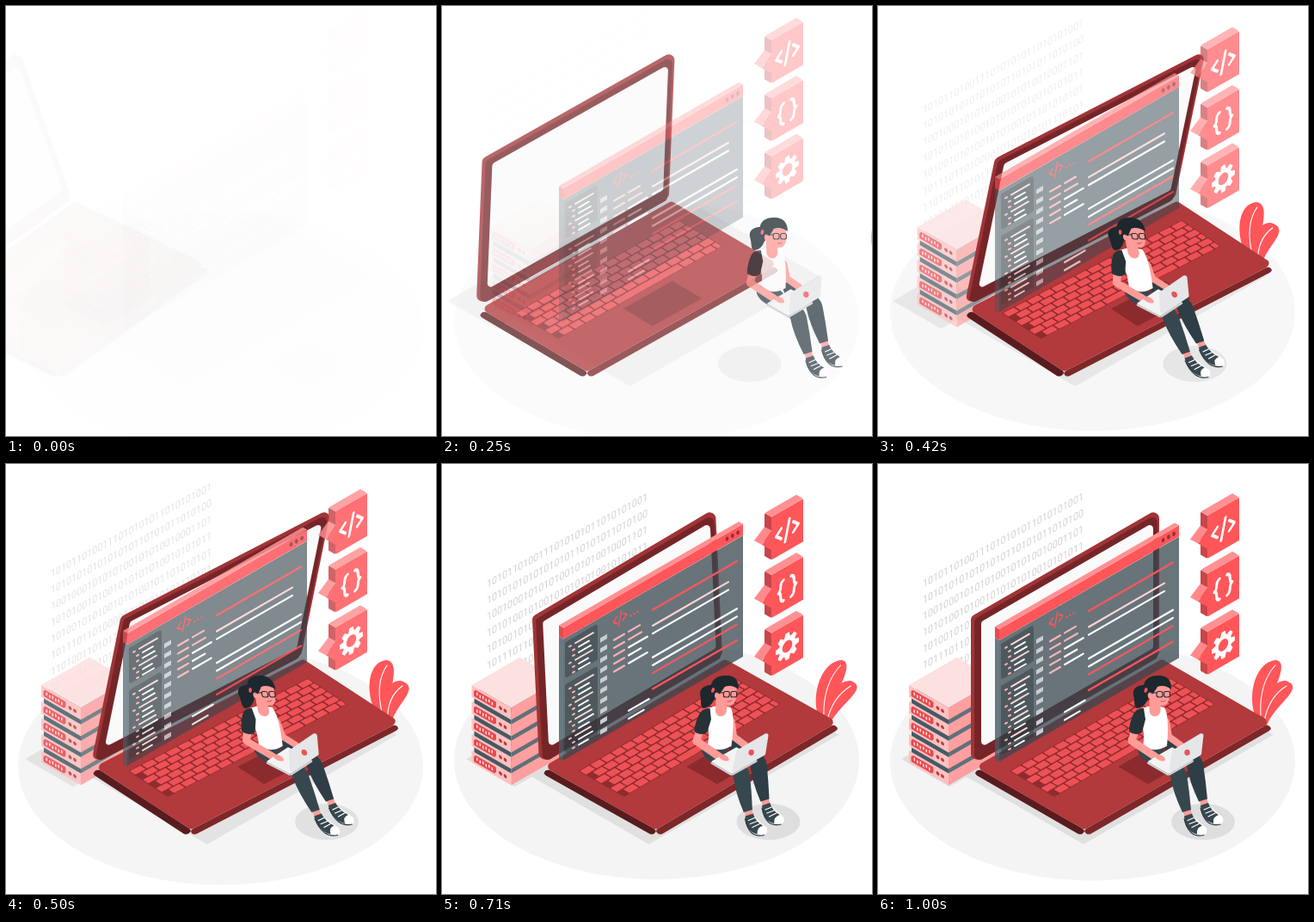
These frames come from a looping animation (500x500 px, 1040 ms). An HTML page with a canvas:

```html
<!DOCTYPE html>
<html lang="en">
<head>
<meta charset="utf-8">
<title>Coding workspace</title>
<style>
html, body { margin: 0; width: 100%; height: 100%; overflow: hidden; background: #fff; }
canvas { display: block; width: 500px; height: 500px; }
</style>
</head>
<body>
<canvas id="stage"></canvas>
<script>
const SIZE = 500, LOOP = 1040, FPS = 24, ISO = .577;
const CORAL = '#ff565a', LIGHT = '#ff9193', PINK = '#ffb3b5', WHITE = '#fff', KEY = '#ee5155';
const HAIR = '#1c282e', INK = '#263238', SLATE = '#37474f', SKIN = '#ff9c98';
const scale = Math.max(1, window.devicePixelRatio || 1);
const stage = document.getElementById('stage');
const buffer = document.createElement('canvas');
stage.width = stage.height = buffer.width = buffer.height = SIZE * scale;
const out = stage.getContext('2d'), g = buffer.getContext('2d');

function seeded(seed) {
  return () => (seed = (seed * 16807) % 2147483647) / 2147483647;
}

// ---- timing ----
const bez = (s, a, b) => 3 * (1 - s) ** 2 * s * a + 3 * (1 - s) * s * s * b + s ** 3;
function ease(u) {
  if (u <= 0) return 0;
  if (u >= 1) return 1;
  let lo = 0, hi = 1;
  for (let i = 0; i < 30; i++) {
    const m = (lo + hi) / 2;
    if (bez(m, .36, .5) < u) lo = m; else hi = m;
  }
  return bez(lo, -.01, 1.38);
}

// Rush in sideways with a lean that swings past upright and settles.
function rush(t, dir, pivot) {
  let dx = 0, deg = 0, alpha = 1;
  if (t < .6) {
    alpha = ease(t / .6);
    dx = 250 * (1 - alpha);
    deg = -20 + 30 * alpha;
  } else if (t < .8) deg = 10 - 12 * ease((t - .6) / .2);
  else deg = -2 + 2 * ease((t - .8) / .2);
  return { dx: dx * dir, lean: Math.tan(deg * dir * Math.PI / 180), pivot, alpha };
}

function slide(t, dx, dy) {
  const alpha = ease(t);
  return { dx: dx * (1 - alpha), dy: dy * (1 - alpha), alpha };
}

// ---- drawing helpers ----
function poly(color, pts, r = 0) {
  const n = pts.length, last = pts[n - 1];
  g.beginPath();
  g.moveTo((pts[0][0] + last[0]) / 2, (pts[0][1] + last[1]) / 2);
  pts.forEach((p, i) => g.arcTo(...p, ...pts[(i + 1) % n], r));
  g.closePath();
  g.fillStyle = color;
  g.fill();
}
// Upright face: width w along the slope s (-1 rises to the right), height h.
function panel(color, x, y, w, h, r = 0, s = -1) {
  const d = s * ISO * w;
  poly(color, [[x, y], [x + w, y + d], [x + w, y + d + h], [x, y + h]], r);
}
// Flat face from its left corner: a runs up-right, b runs down-right.
function tile(color, x, y, a, b, r = 0) {
  const at = (u, v) => [x + u + v, y + ISO * (v - u)];
  poly(color, [at(0, 0), at(a, 0), at(a, b), at(0, b)], r);
}
function slab(x, y, a, b, h, [top, left, right], r = 0) {
  panel(left, x, y, b, h, r, 1);
  panel(right, x + b, y + ISO * b, a, h, r);
  tile(top, x, y, a, b, r);
}
function oval(color, x, y, rx, ry, rot = 0) {
  g.beginPath();
  g.ellipse(x, y, rx, ry, rot, 0, 7);
  g.fillStyle = color;
  g.fill();
}
function shape(color, d) {
  g.fillStyle = color;
  g.fill(new Path2D(d));
}
function stroke(color, w, d) {
  g.strokeStyle = color;
  g.lineWidth = w;
  g.lineCap = g.lineJoin = 'round';
  g.stroke(new Path2D(d));
}
function within(x, y, fn, m = [1, 0, 0, 1]) {
  g.save();
  g.transform(...m, x, y);
  fn();
  g.restore();
}
const WALL = [.866, -.5, 0, 1];

// ---- scene parts ----
function floor() { oval('#f4f4f4', 249.5, 346, 235.5, 138.5); }

function shadows() {
  tile('#e0e0e0', 27, 343, 52, 56);
  tile('#e0e0e0', 100, 362, 221, 139);
  oval('#dedede', 378, 416, 37, 21);
}

function binary() {
  const rand = seeded(77);
  g.fillStyle = '#d2d2d2';
  g.font = '12.4px Roboto, Arial, sans-serif';
  for (let row = 0; row < 8; row++) {
    let bits = '';
    for (let bit = 0; bits.length < 31; bits += bit) bit = rand() < .8 ? 1 - bit : bit;
    within(52, 144 + 19 * row, () => g.fillText(bits, 0, 0), [.866, -.476, 0, 1]);
  }
}

function servers() {
  for (let i = 4; i >= 0; i--) {
    const y = 257 + 19 * i;
    if (i < 4) slab(39, y + 8, 56, 43, 13, ['#455a64', '#455a64', '#607078']);
    slab(36, y, 56, 46, 14, ['#fde0e0', '#ffc1c1', '#ff9fa0']);
    panel('#e8494e', 38.5, y + 4.5, 26, 8.5, 2, 1);
    within(36, y, () => {
      g.fillStyle = '#ffdcdc';
      for (let k = 0; k < 6; k++) g.fillRect(5.5 + k * 3.5, 5 + (k + i) % 2, 1.6, 3.5);
      for (const x of [33.5, 39]) oval('#b8393d', x, 7.5, 1.9, 2.1);
    }, [1, ISO, 0, 1]);
  }
}

function plant() {
  shape(CORAL, 'M447 305C426 286 434 230 463 228C482 232 450 275 449 305Z');
  shape(CORAL, 'M448 305C448 265 463 251 474 252C499 260 460 280 452 305Z');
  stroke(WHITE, 1.1, 'M445 292Q443 255 462 234M449 300Q454 271 475 258');
}

function laptop() {
  slab(113, 352, 217, 127, 9, ['#b2393c', '#591c1e', '#7d2729'], 5);
  const x = 153, y = 357, rows = 6, cols = 15, a = 187 / cols, b = 52 / rows;
  tile('#8f2c30', x, y, 187, 52, 1);
  for (let r = 0; r < rows; r++) for (let c = 0; c < cols - r % 2 / 2; c++) {
    const space = r === rows - 1 && c > 4 && c < 10;
    const u = (c + r % 2 / 2) * a + .9, v = r * b + .9;
    const w = Math.min(a - 1.5 + (space ? 2 : 0), 186.2 - u);
    tile(KEY, x + u + v, y + ISO * (v - u), w, b - 1.5, .8);
  }
  tile('#8b2b2e', 279, 352, 56, 35, 1);
  // lid: edge, frame, glass
  panel('#a03437', 108, 177.5, 219, 171, 7);
  panel('#752528', 112, 180.5, 213, 168, 6);
  panel('#fafafa', 120, 183.5, 200, 146, 4);
}

function code(c, x1, x2, color, w = 2.2) {
  const y = x => c - ISO * (x - 200);
  stroke(color, w, `M${x1} ${y(x1)}L${x2} ${y(x2)}`);
}

function listing(x, y, n) {
  const h = n * 6.5 + 3;
  panel('rgba(38,50,56,.42)', x, y, 38, h, 2);
  for (let i = 0; i < n; i++) {
    const c = y + 6 + i * 6.5 - ISO * 54, inset = 4 * (i % 3 > 0);
    code(c, x + 5 + inset, x + 7 + inset, PINK, 2);
    code(c, x + 12 + inset, x + 33 - (i * 5) % 7, i % 3 ? WHITE : '#ffdada', 1.9);
  }
}

function editor() {
  const rand = seeded(9);
  panel('rgba(69,90,100,.8)', 136, 202, 5, 142, 0, 1);
  panel('rgba(55,71,79,.75)', 141, 205, 209, 141);
  slab(136, 189, 209, 5, 13, [LIGHT, '#e64c50', CORAL]);
  listing(143, 209, 6);
  listing(143, 258, 12);
  for (let i = 0; i < 10; i++) panel('#c9ced1', 184, 204 + i * 11.9, 8, 5.2);
  for (let i = 0; i < 3; i++) {
    oval('#8a3438', 331.5 + i * 6.3, 88.5 - i * 3.6, 1.8, 2.6, .3);
    oval(CORAL, 219.5 + i * 4, 178 - i * 2.3, 1, 1.2);
  }
  within(207, 181, () => stroke(CORAL, 1.7, 'M-4 -4L-9 0L-4 4M2 -8L-2 8M4 -4L9 0L4 4'), WALL);

  // long lines by row: c coral, p pink, w white
  const tint = { c: CORAL, p: '#ffd3d4', w: WHITE };
  [...'c.pw..wwc.c..'].forEach((key, i) => {
    const c = 197 + 9.2 * i, short = i > 0 && i < 6;
    if (short) code(c, 200, 212, PINK);
    if (short || i > 10) code(c, 217, 230 + rand() * 11, i < 3 ? PINK : WHITE);
    if (tint[key]) code(c, 245, i === 2 || i === 3 ? 333 : 343, tint[key]);
  });
}

function chevrons() {
  stroke(WHITE, 3.4, 'M-8 -6L-15 0L-8 6M3 -12L-3 12M8 -6L15 0L8 6');
}
function braces() {
  for (const side of [1, -1]) within(0, 0, () =>
    stroke(WHITE, 3.5, 'M-5 -12Q-9 -11 -9 -6Q-9 -1 -12 0Q-9 1 -9 6Q-9 11 -5 12'), [side, 0, 0, 1]);
}
function gear() {
  g.strokeStyle = g.fillStyle = WHITE;
  g.lineWidth = 4.6;
  g.beginPath();
  g.arc(0, 0, 9, 0, 7);
  g.stroke();
  for (let i = 0; i < 8; i++) {
    g.rotate(Math.PI / 4);
    poly(WHITE, [[9, -4], [15.5, -2.6], [15.5, 2.6], [9, 4]], .8);
  }
}
function badges() {
  [chevrons, braces, gear].forEach((sign, i) => within(0, i * 67.5, () => {
    slab(375, 55.5, 37, 8, 50, [LIGHT, '#c8454a', CORAL], 1);
    poly(CORAL, [[372, 92.5], [384, 76], [384, 99]]);
    poly('#ff898b', [[363, 87.5], [375, 71.5], [383.5, 76], [372, 92.5]]);
    within(401.5, 75.5, sign, WALL);
  }));
}

function leg(color) {
  stroke(SKIN, 9, 'M358 398L361 410');
  shape(color, 'M312 334L316 349L340 363Q343 382 354 405L364 402Q362 380 359 361Q357 351 346 347L322 334Z');
  within(356, 407.5, () => {
    shape(WHITE, 'M0 4Q4 26 20 25Q28 24 26 16L10 2Z');
    shape(SLATE, 'M0 2L9 -1Q12 8 21 13Q14 15 15 23Q1 20 0 2Z');
    stroke(WHITE, 1.2, 'M4 7L11 4M6 11L14 8M9 15L17 11');
    stroke(INK, 1.1, 'M0 5Q5 28 23 24');
  });
}

function head() {
  stroke(SKIN, 13, 'M322 276L322 287');
  shape(SKIN, 'M314 256Q325 249 339 258V271Q338 281 330 281Q318 281 314 269Z');
  shape(HAIR, 'M313 274C304 258 310 246 325 246C336 245 342 252 341 262Q333 256 325 259Q320 268 313 274Z');
  oval(SKIN, 316.5, 269, 2.8, 3.6);
  oval(CORAL, 311.5, 263, 1.8, 3, .3);
  stroke(HAIR, 1.1, 'M317 266H324');
  for (const x of [327.5, 336]) {
    g.beginPath();
    g.roundRect(x - 3.4, 264.5, 6.8, 6.5, 2);
    g.stroke();
  }
  stroke('#b8474a', .9, 'M329 276Q332 277 334 275');
}

function coder() {
  shape(HAIR, 'M314 257C304 256 295 260 297 269C299 276 297 282 301 284C310 284 315 274 316 264Z');
  within(19, -12.5, () => leg('#2f3e46'));
  oval(SLATE, 319, 337, 18, 11, .45);
  leg(SLATE);
  stroke(SKIN, 8, 'M335 300L338 317L352 327');
  shape(WHITE, 'M307 284Q318 279 333 283Q339 293 336 328Q322 336 308 329Q311 312 306 300Z');
  head();
  stroke(SKIN, 9, 'M298 312L295 322L322 340');
  shape(INK, 'M309 284Q299 284 296 293Q292 303 292 311Q299 317 307 312L311 297Z');
  // notebook and typing hand
  slab(313, 346, 29, 25, 2.5, ['#f3f3f3', '#cfd3d5', '#cfd3d5'], 1);
  oval(SKIN, 328, 341.5, 6.5, 3.2, .45);
  poly('#e4e6e7', [[342, 333], [379, 311], [376, 338], [338, 360]], 2.5);
  oval(KEY, 359.5, 335.5, 3.2, 3.4);
}

// ---- composition ----
function layer(draw, { dx = 0, dy = 0, lean = 0, pivot = 0, alpha = 1 }) {
  if (alpha <= 0) return;
  g.setTransform(1, 0, 0, 1, 0, 0);
  g.clearRect(0, 0, buffer.width, buffer.height);
  g.setTransform(scale, 0, lean * scale, scale, (dx - pivot * lean) * scale, dy * scale);
  draw();
  out.globalAlpha = Math.min(1, alpha);
  out.drawImage(buffer, 0, 0);
}

function render(ms) {
  // The motion advances in 24 steps per second.
  const t = (Math.floor((ms + 5) * FPS / 1000) + 1.2) / FPS;
  out.globalAlpha = 1;
  out.fillStyle = WHITE;
  out.fillRect(0, 0, stage.width, stage.height);
  layer(floor, slide(t, 0, 30));
  layer(shadows, slide(t, -30, 0));
  layer(binary, slide((t - .2) / .8, 0, -30));
  layer(servers, slide(t, 30, 0));
  layer(plant, rush(t, 1, 267));
  layer(laptop, rush(t, -1, 243));
  layer(editor, slide(t, 0, 30));
  layer(badges, slide(t, 0, -30));
  layer(coder, rush(t, 1, 338));
}

const start = performance.now();
function tick() {
  render((performance.now() - start) % LOOP);
  requestAnimationFrame(tick);
}
tick();
</script>
</body>
</html>
```
